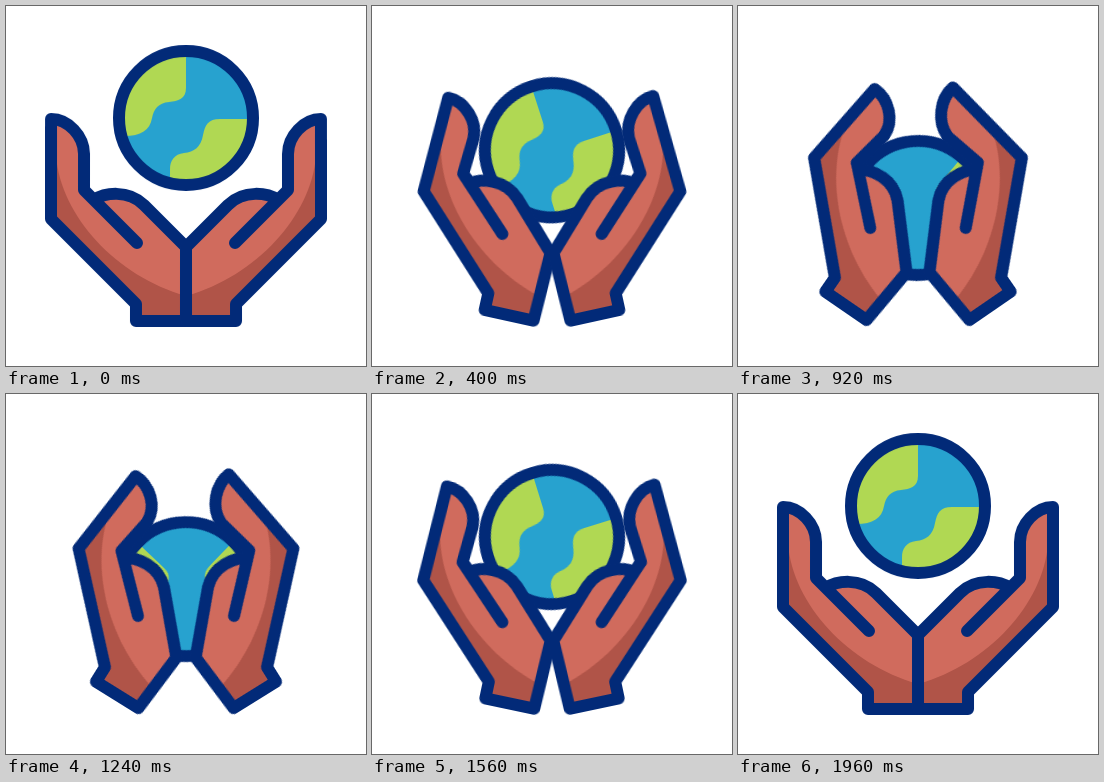
Animation, 360 px wide and 360 px high, one loop 2 s. Source, as an HTML page:

```html
<!DOCTYPE html>
<html lang="en">
<head>
<meta charset="utf-8">
<title>Hands holding a globe</title>
<style>
  html, body { margin: 0; width: 100%; height: 100%; overflow: hidden; background: #fff; }
  svg { display: block; width: 100vw; height: 100vh; }

  .line { stroke: #022a78; stroke-width: 12; stroke-linecap: round; stroke-linejoin: round; }
  .skin { fill: #d06b5d; }
  .shade { fill: #b05448; }
  .sea { fill: #27a2cf; }
  .land { fill: #b0d853; }
  .clear { fill: none; }

  .globe, .hand, .left path.line, .left .skin, .right path.line, .right .skin {
    animation: 2s cubic-bezier(.58, 0, .42, 1) -20ms infinite;
  }
  .globe { transform-origin: 180px 112px; animation-name: sink; }
  .hand { transform-origin: 180px 315px; animation-name: close; }
  .left path.line, .left .skin { animation-name: bend-left; }
  .right path.line, .right .skin { animation-name: bend-right; }

  /* start and end poses come from the elements themselves */
  @keyframes sink {
    48%, 51.5% { transform: translate(0, 90px) rotate(-50deg); }
  }
  @keyframes close {
    48%, 51.5% { transform: translate(-51.5px, -1px) rotate(34.5deg); }
  }
  @keyframes bend-left {
    48%, 51.5% {
      d: path("M56 120 C73 120 91 135 90 154 L83 191 L90 195 C99 188 122 183 138 199 L186 253 L180 315 L130 315 L130 298 L45 211 Z M83 191 L131 237");
    }
  }
  @keyframes bend-right {
    48%, 51.5% {
      d: path("M62 114 C79 116 95 133 94 152 L84 190 L90 195 C99 188 122 183 138 199 L186 253 L180 315 L130 315 L130 298 L45 211 Z M84 190 L131 237");
    }
  }
</style>
</head>
<body>
<svg viewBox="0 0 360 360">
  <defs>
    <path id="shade" class="shade" d="M50 150 C55 210 110 270 180 290 V315 H130 V298 L45 213 Z"/>
  </defs>

  <g class="globe">
    <circle class="sea" cx="180" cy="112" r="67"/>
    <path class="land" d="M180 46 V82 C180 93 172 95 163 96 C152 97 148 103 146 112 C144 124 135 130 118 130 H116 A66 66 0 0 1 180 46 Z"/>
    <path class="land" d="M246 113 H214 C202 113 199 119 197 129 C195 141 188 146 178 147 C168 148 164 155 164 163 V176 A66 66 0 0 0 246 113 Z"/>
    <circle class="line clear" cx="180" cy="112" r="67"/>
  </g>

  <g class="left">
    <g class="hand">
      <path class="skin" d="M45 113 C62 113 78 130 78 148 L78 184 L88 194 C98 187 122 183 138 199 L180 241 L180 315 L130 315 L130 298 L45 213 Z M78 184 L131 237"/>
      <use href="#shade"/>
      <path class="line clear" d="M45 113 C62 113 78 130 78 148 L78 184 L88 194 C98 187 122 183 138 199 L180 241 L180 315 L130 315 L130 298 L45 213 Z M78 184 L131 237"/>
    </g>
  </g>

  <g class="right" transform="translate(360) scale(-1 1)">
    <g class="hand">
      <path class="skin" d="M45 113 C62 113 78 130 78 148 L78 184 L88 194 C98 187 122 183 138 199 L180 241 L180 315 L130 315 L130 298 L45 213 Z M78 184 L131 237"/>
      <use href="#shade"/>
      <path class="line clear" d="M45 113 C62 113 78 130 78 148 L78 184 L88 194 C98 187 122 183 138 199 L180 241 L180 315 L130 315 L130 298 L45 213 Z M78 184 L131 237"/>
    </g>
  </g>
</svg>
</body>
</html>
```
